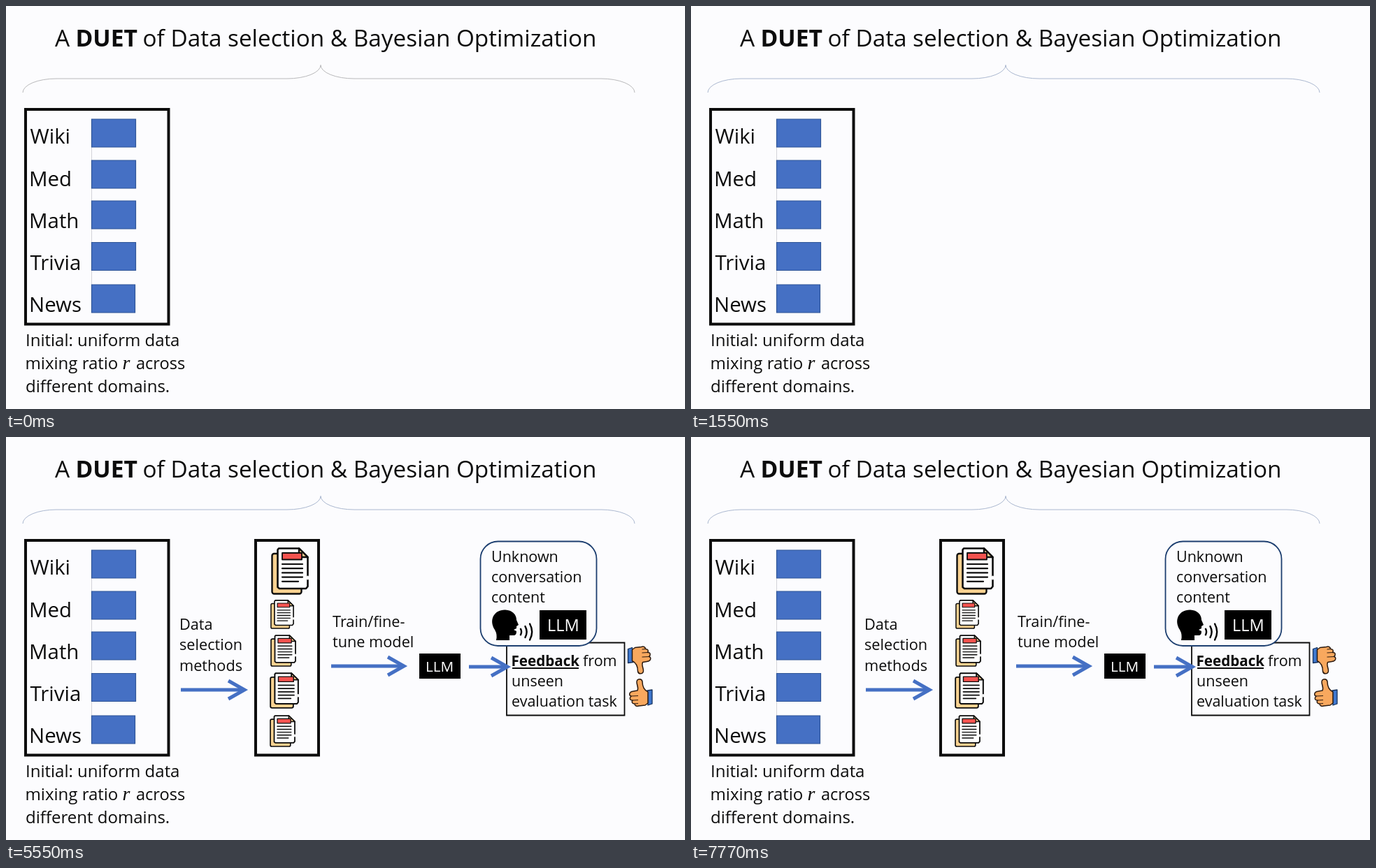
Recreate the animation shown at these times as an HTML page with a canvas. Size 971 by 577 pixels, loop 8000 ms.

```html
<!DOCTYPE html>
<html lang="en">
<head>
<meta charset="utf-8">
<title>Data selection and Bayesian Optimization</title>
<style>
html, body { margin: 0; width: 100%; height: 100%; overflow: hidden; background: #fcfcfe; }
canvas { display: block; }
</style>
</head>
<body>
<canvas id="stage" width="971" height="577"></canvas>
<script>
const ctx = document.getElementById('stage').getContext('2d');
const LOOP = 8000;
const BG = '#fcfcfe', INK = '#0c0c0c', BLUE = '#4570c4';
const SKIN = '#f8a85e', TAN = '#fad291', RED = '#f4534f';
const SANS = '"Open Sans", "Noto Sans", sans-serif';
const SERIF = '"Liberation Serif", "Noto Serif", serif';

function text(str, x, y, size, color = INK, style = '', family = SANS) {
  ctx.font = `${style} ${size}px ${family}`;
  ctx.fillStyle = color;
  ctx.fillText(str, x, y);
}

function lines(list, x, y, step, size) {
  list.forEach((str, i) => text(str, x, y + i * step, size));
}

function stroke(color, width) {
  ctx.strokeStyle = color;
  ctx.lineWidth = width;
  ctx.stroke();
}

function fill(color) {
  ctx.fillStyle = color;
  ctx.fill();
}

function poly(points, closed) {
  ctx.beginPath();
  points.forEach(([x, y]) => ctx.lineTo(x, y));
  if (closed) ctx.closePath();
}

function frame(x, y, w, h, width) {
  ctx.beginPath();
  ctx.rect(x, y, w, h);
  stroke(INK, width);
}

function arrow(x1, x2, y) {
  poly([[x1, y], [x2 - 3, y]]);
  stroke(BLUE, 5);
  poly([[x2 - 26, y - 13], [x2 - 3, y], [x2 - 26, y + 13]]);
  stroke(BLUE, 5);
}

function modelBox(x, y, w, h, tx, ty, size) {
  ctx.fillStyle = '#000';
  ctx.fillRect(x, y, w, h);
  text('LLM', tx, ty, size, '#fff');
}

function brace(t) {
  ctx.beginPath();
  ctx.moveTo(24, 124);
  ctx.ellipse(72, 124, 48, 20, 0, Math.PI, Math.PI * 1.5);
  ctx.lineTo(402, 104);
  ctx.ellipse(402, 84.5, 48, 19.5, 0, Math.PI / 2, 0, true);
  ctx.ellipse(498, 84.5, 48, 19.5, 0, Math.PI, Math.PI / 2, true);
  ctx.lineTo(851, 104);
  ctx.ellipse(851, 124, 48, 20, 0, -Math.PI / 2, 0);
  stroke(t < 250 ? '#b9b9bb' : '#abb8d0', 1);
}

function domains() {
  frame(28, 148, 204.5, 307.5, 4);
  poly([[122.5, 162], [122.5, 439]]);
  stroke('#d4d4d8', 1);
  const names = ['Wiki', 'Med', 'Math', 'Trivia', 'News'];
  const tops = [162, 221, 279, 338.5, 399];
  names.forEach((name, i) => {
    text(name, /^[MN]/.test(name) ? 33 : 34.5, 197.4 + i * 60.2, 29.4);
    ctx.beginPath();
    ctx.rect(122.5, tops[i], i < 4 ? 63 : 62, 40);
    fill(BLUE);
    stroke('#2f5597', 1.2);
  });
  text('Initial: uniform data', 28, 487, 24);
  text('mixing ratio', 27.5, 520, 24);
  text('r', 166.5, 520, 28, INK, 'italic', SERIF);
  text('across', 186, 520, 23.6);
  text('different domains.', 28, 553, 24);
}

// Stacked pages on a 54 by 68 grid, fitted to the given box
function pages(x, y, w, h) {
  ctx.save();
  ctx.translate(x, y);
  ctx.scale(w / 54, h / 68);
  ctx.lineCap = ctx.lineJoin = 'round';
  ctx.beginPath();
  ctx.roundRect(1.5, 9, 42, 57.5, 3);
  fill(TAN);
  stroke(INK, 2.4);
  poly([[9.5, 3.5], [11, 1.5], [40, 1.5], [52.5, 14], [52.5, 56], [50, 59], [12, 59], [9.5, 57]], true);
  fill('#fff');
  stroke(INK, 2.6);
  poly([[40, 1.5], [40, 14], [52.5, 14]], true);
  fill(TAN);
  stroke(INK, 2.4);
  poly([[52.5, 42], [52.5, 45]]);
  stroke('#fff', 3);
  ctx.beginPath();
  ctx.rect(16, 8, 28, 9.5);
  fill(RED);
  stroke(INK, 1.8);
  for (let i = 0; i < 5; i++) {
    const ly = 24 + i * 6.2;
    poly([[16, ly], [i === 4 ? 39 : 45, ly]]);
    stroke(INK, 2.2);
  }
  ctx.restore();
}

function selection() {
  lines(['Data', 'selection', 'methods'], 248, 276, 29.4, 21.7);
  arrow(250, 344, 362);
  frame(357, 148, 90, 307.5, 4);
  pages(379, 158, 54, 68);
  pages(378, 233, 34, 42);
  pages(378, 283, 37, 46);
  pages(377, 337, 42, 52);
  pages(377, 398, 37, 46);
}

function training() {
  lines(['Train/fine-', 'tune model'], 467, 271.5, 29, 21.7);
  arrow(465, 572, 328);
  modelBox(591, 310, 59, 36, 600, 335.5, 20.7);
}

function speaker() {
  ctx.beginPath();
  ctx.moveTo(701, 291);
  ctx.quadraticCurveTo(703, 283, 699, 276);
  ctx.bezierCurveTo(690, 262, 698, 247, 714, 247.5);
  ctx.bezierCurveTo(724, 248, 730, 254, 730, 262);
  ctx.lineTo(733, 269);
  ctx.lineTo(730, 271);
  ctx.lineTo(730, 274);
  ctx.lineTo(726, 276);
  ctx.lineTo(730, 278);
  ctx.quadraticCurveTo(730, 284, 726, 284);
  ctx.lineTo(720, 284);
  ctx.lineTo(720, 291);
  ctx.closePath();
  fill('#000');
  ctx.lineCap = 'round';
  for (const r of [9, 16.5, 24]) {
    ctx.beginPath();
    ctx.arc(728, 279, r, -0.5, 0.5);
    stroke('#000', 2.4);
  }
  ctx.lineCap = 'butt';
}

function thumb(x, y, turn) {
  ctx.save();
  ctx.translate(x, y);
  ctx.rotate(turn);
  ctx.lineJoin = 'round';
  poly([[9, -3], [16, -4], [16, 16], [10, 18]], true);
  fill('#3f78cf');
  stroke('#14305c', 1.3);
  ctx.beginPath();
  ctx.moveTo(10, -1);
  ctx.bezierCurveTo(4, -4, 2, -9, 2, -16);
  ctx.bezierCurveTo(1, -21, -6, -20, -6, -15);
  ctx.bezierCurveTo(-6, -11, -3, -7, -5, -3);
  ctx.lineTo(-11, -2);
  ctx.bezierCurveTo(-18, -1, -17, 5, -14, 5);
  ctx.bezierCurveTo(-17, 8, -16, 11, -12, 11);
  ctx.bezierCurveTo(-14, 14, -12, 16, -9, 16);
  ctx.bezierCurveTo(-9, 19, -6, 20, -3, 19);
  ctx.lineTo(6, 18);
  ctx.lineTo(10, 15);
  ctx.closePath();
  fill(SKIN);
  stroke('#2b1a10', 1.5);
  for (const [x1, y1] of [[-14, 5], [-12, 11], [-9, 16]]) {
    poly([[x1, y1], [-4, y1 - 0.5]]);
    stroke('#2b1a10', 1.2);
  }
  ctx.restore();
}

function feedback() {
  frame(716, 294.5, 168.5, 104, 1.8);
  arrow(662, 720, 329);
  ctx.beginPath();
  ctx.roundRect(678.5, 149.5, 166, 149.5, 25);
  fill(BG);
  stroke('#1d3f70', 1.8);
  lines(['Unknown', 'conversation', 'content'], 694, 179, 29.2, 21.5);
  speaker();
  modelBox(763, 248, 67, 42, 774, 277.5, 23.5);
  text('Feedback', 722.5, 327.5, 20.6, INK, 'bold');
  ctx.fillRect(724, 330, 95, 2);
  text('from', 825, 327.5, 21.5);
  lines(['unseen', 'evaluation task'], 723, 356.5, 29.3, 21.5);
  thumb(905.5, 319.5, Math.PI);
  thumb(908, 366, 0);
}

function draw(t) {
  ctx.fillStyle = BG;
  ctx.fillRect(0, 0, 971, 577);
  text('A', 70, 58, 33.4);
  text('DUET', 99.5, 58, 33.6, INK, 'bold');
  text('of Data selection & Bayesian Optimization', 195.5, 58, 33.25);
  brace(t);
  domains();
  if (t >= 1940) selection();
  if (t >= 3680) training();
  if (t >= 5550) feedback();
}

const start = performance.now();
function tick() {
  draw((performance.now() - start) % LOOP);
  requestAnimationFrame(tick);
}
tick();
</script>
</body>
</html>
```
